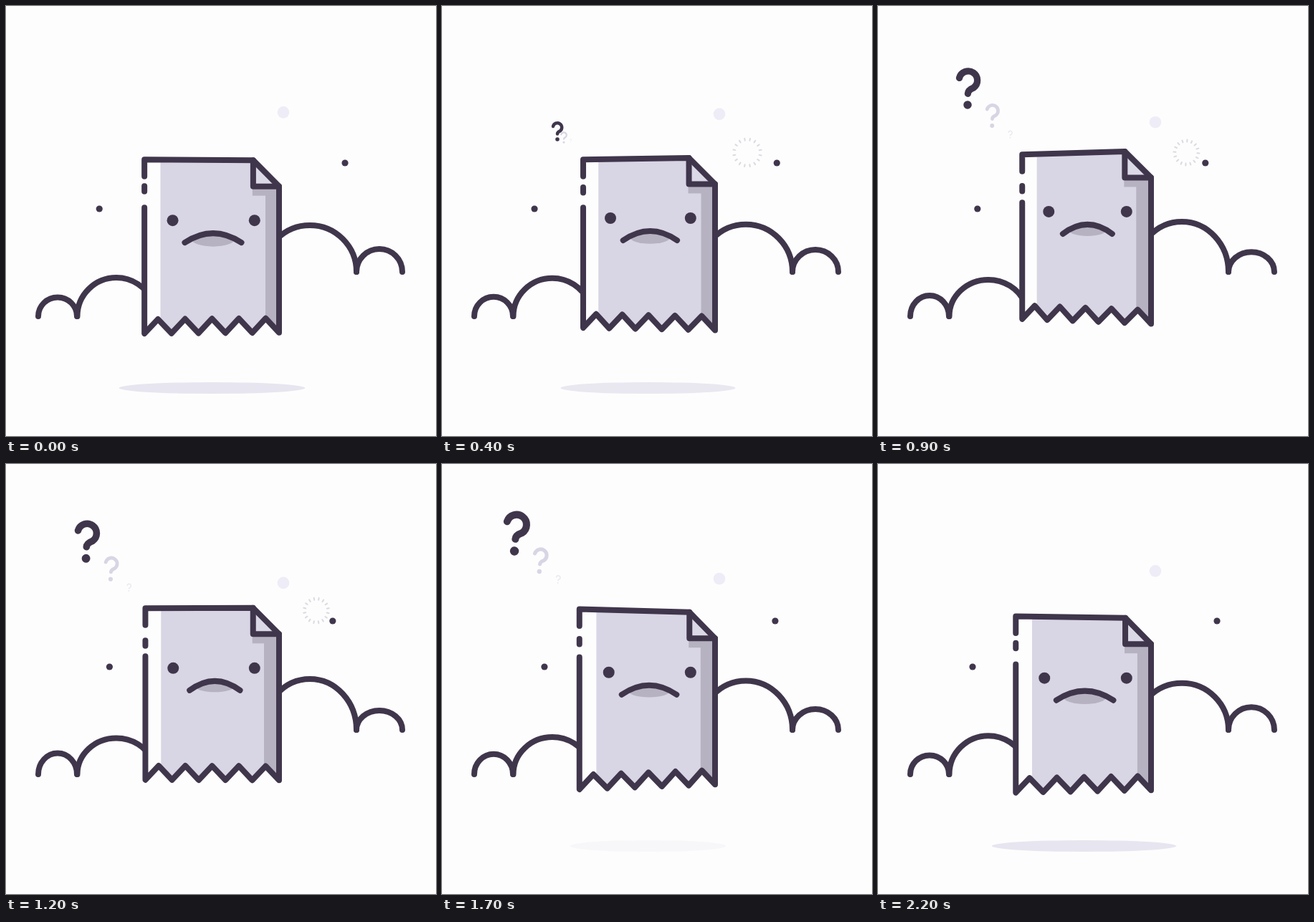
Write an HTML page with a canvas that moves like this. It is 600 px wide and 600 px high and loops after 2.3 s.

```html
<!DOCTYPE html>
<html>
<head>
<meta charset="utf-8">
<style>
html, body { margin: 0; width: 100%; height: 100%; overflow: hidden; background: #fdfdfd; }
canvas { display: block; }
</style>
</head>
<body>
<canvas id="stage" width="600" height="600"></canvas>
<script>
const ctx = document.getElementById('stage').getContext('2d');
const LOOP = 2300, STEP = 100;
const INK = '#40364c', PAPER = '#d8d5e4', SHADE = '#b6b2c1', BACK = '#fdfdfd';
const HOOK = new Path2D('M-12-14A12.4 12.4 0 1 1 7.5-1.2Q0 2 0 7');
const MARKS = [
  { from: [198, 228], to: [129, 122], size: 1, weight: 9, color: INK, alpha: 1 },
  { from: [182, 207], to: [163, 160], size: .61, weight: 7.5, color: PAPER, alpha: 1 },
  { from: [176, 190], to: [188, 186], size: .2, weight: 7, color: PAPER, alpha: .5 }
];
let now = 0;

// Cosine over one loop that peaks at the given time
const wave = peak => Math.cos(2 * Math.PI * (now - peak) / LOOP);
const clamp = v => Math.min(1, Math.max(0, v));
const span = (from, to) => clamp((now - from) / (to - from));

function dot(x, y, rx, color, ry = rx) {
  ctx.fillStyle = color;
  ctx.beginPath();
  ctx.ellipse(x, y, rx, ry, 0, 0, 2 * Math.PI);
  ctx.fill();
}

function trace(points) {
  ctx.beginPath();
  points.forEach(p => ctx.lineTo(...p));
}

function line(...points) {
  trace(points);
  ctx.stroke();
}

function arch(x, y, rx, ry, from = Math.PI, to = 2 * Math.PI) {
  ctx.beginPath();
  ctx.ellipse(x, y, rx, ry, 0, from, to);
  ctx.stroke();
}

function drawMark({ from, to, size, weight, color, alpha }, order) {
  const grow = Math.sin(span(300, 600) * Math.PI / 2);
  const drift = span(600, 1700);
  const sway = -5 * Math.cos(12 * drift) * (1 - drift);
  const reach = (axis, shift) => from[axis] + (to[axis] + shift - from[axis]) * grow;
  const scale = size * grow * (1 + .12 * drift);
  if (!scale) return;
  ctx.save();
  ctx.globalAlpha = alpha * (1 - span(1700 + 100 * order, 1800 + 100 * order));
  ctx.translate(reach(0, sway - 26 * drift), reach(1, -25 * drift));
  ctx.rotate(.08 * drift);
  ctx.scale(scale, scale);
  ctx.strokeStyle = color;
  ctx.lineWidth = weight;
  ctx.stroke(HOOK);
  dot(0, 22, weight * .62, color);
  ctx.restore();
}

function drawBurst() {
  ctx.save();
  ctx.globalAlpha = span(200, 400) * (1 - span(1200, 1600)) * .9;
  ctx.translate(426 + 7 * span(400, 1200), 204.5);
  ctx.rotate(now / 2000);
  ctx.strokeStyle = '#d8d6de';
  ctx.lineWidth = 2;
  const outer = 21 - 2 * span(400, 600);
  for (let i = 0; i < 16; i++) {
    ctx.rotate(Math.PI / 8);
    line([outer - 4, 0], [outer - 1, 0]);
  }
  ctx.restore();
}

function drawClouds(lift) {
  arch(72, 433, 27, 26.5 + 3 * lift);
  arch(154, 433, 54.5, 54 - 3.5 * lift, Math.PI, 2 * Math.PI - .4);
  arch(424, 371, 65, 65 + 6 * lift, Math.PI * 1.25);
  arch(521, 371, 32, 32 - 5 * lift);
}

// bob: 1 at the lowest point, -1 at the highest; turn: sideways swing of the sheet
function drawPage(bob, turn) {
  const right = 381, y = 208 + 7.2 * bob;
  const left = 194 + 6 * turn + 4 * turn * turn;
  const width = right - left;
  const top = y + 5.5 * turn, foldX = 344.8 - .6 * turn, foldY = y + 36.5;

  const teeth = [];
  for (let i = 10; i >= 0; i--) {
    const u = i / 10, x = u - .045 * turn * u * (1 - u);
    teeth.push([left + width * x, y + 240.5 - 8.5 * turn * (1 - x) - (i % 2) * width / 9.4]);
  }
  const edge = [[left, top], [foldX, y], [right, foldY], ...teeth];

  ctx.save();
  trace(edge);
  ctx.clip();
  ctx.fillStyle = BACK;
  ctx.fillRect(0, 0, 600, 600);
  ctx.fillStyle = PAPER;
  ctx.fillRect(left + 22 - 2 * turn, 0, 400, 600);
  ctx.fillStyle = SHADE;
  ctx.fillRect(361 + bob, foldY, 40, 300);
  ctx.fillRect(foldX - 1, foldY, 40, 13);
  ctx.restore();

  const fold = [[foldX, y], [foldX, foldY], [right, foldY]];
  trace(fold);
  ctx.fillStyle = '#dcd9e7';
  ctx.fill();
  line(...fold);

  // Outline with a broken left side
  const dash = top + 41 - 4 * bob;
  line([left, top + 23.5], ...edge, [left, top + 67]);
  line([left, dash], [left, dash + 7.5]);

  drawFace(left + 39 - 2.5 * turn, y, bob, turn);
}

function drawFace(eye, y, bob, turn) {
  dot(eye, y + 84, 8, INK);
  dot(346.8, y + 84, 8, INK);
  const from = 253 + 3.5 * turn - 3 * bob, to = 327.5 + bob;
  const mid = (from + to) / 2;
  dot(mid, y + 110, (to - from) * .38, SHADE, 9 + 1.5 * bob);
  ctx.beginPath();
  ctx.moveTo(from, y + 115);
  ctx.quadraticCurveTo(mid, y + 89, to, y + 115);
  ctx.stroke();
}

function drawScene() {
  const bob = wave(40), swing = wave(725);
  ctx.fillStyle = BACK;
  ctx.fillRect(0, 0, 600, 600);

  ctx.globalAlpha = clamp(.45 + .8 * bob);
  dot(287.5, 533, 112 + 18 * bob, '#e7e5ef', 8);
  ctx.globalAlpha = 1;

  dot(387, 157 - 9 * wave(100), 8.3, '#eeecf6');
  dot(464.3 + 8.8 * wave(-50), 219, 4.6, INK);
  dot(137 - 8.7 * wave(250), 283, 4.6, INK);
  drawBurst();
  MARKS.forEach(drawMark);

  ctx.strokeStyle = INK;
  ctx.lineWidth = 8;
  drawClouds((1 - bob) / 2);
  drawPage(bob, swing * Math.abs(swing));
}

ctx.lineCap = ctx.lineJoin = 'round';
const start = performance.now();
function frame() {
  now = Math.floor((performance.now() - start) % LOOP / STEP) * STEP;
  drawScene();
  requestAnimationFrame(frame);
}
frame();
</script>
</body>
</html>
```
